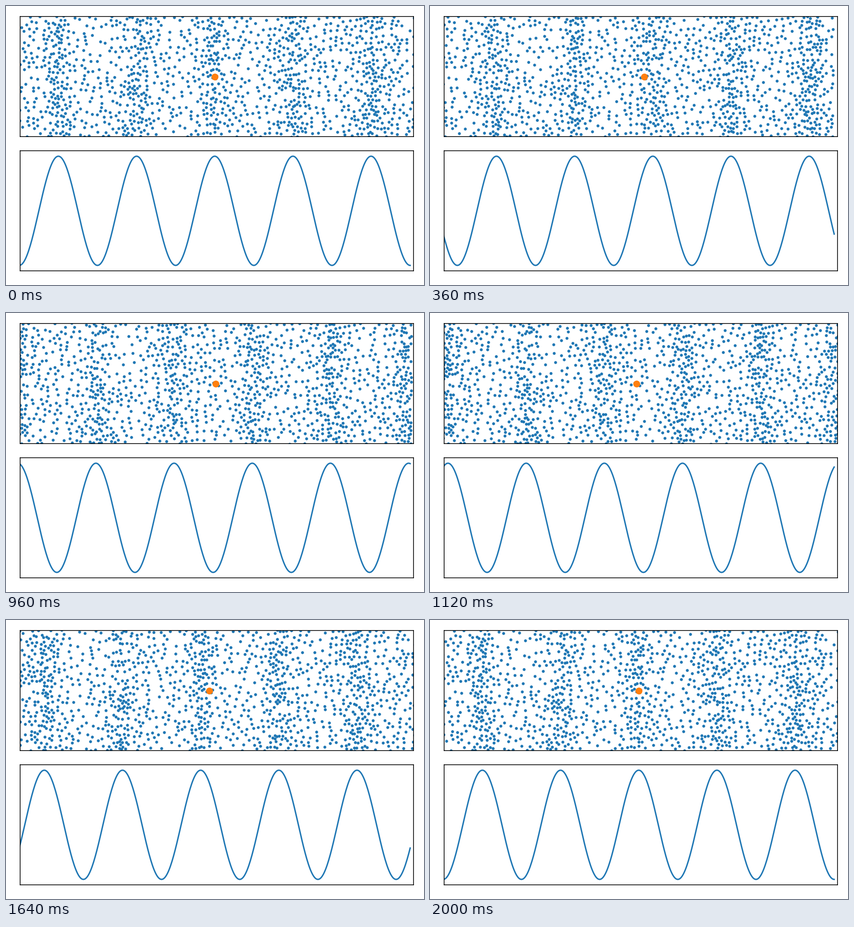
Recreate the animation shown at these times as a matplotlib script. Size 917x611 px, loop 2040 ms.

```python
import matplotlib.pyplot as plt
import numpy as np
from matplotlib.animation import FuncAnimation

W, H, DPI = 917, 611, 128
LEFT, RIGHT = 31, 894
PX = 72 / DPI                  # one pixel in points
STEPS = 50                     # frames per wave period
WAVE = 171.5                   # wavelength
MID = 457.9                    # rest position of the marked particle
SWING = 13.0                   # displacement amplitude
BLUE, ORANGE = "#1f77b4", "#ff7f0e"


def panel(top, bottom, ylim):
    ax = fig.add_axes([LEFT / W, 1 - bottom / H,
                       (RIGHT - LEFT) / W, (bottom - top) / H])
    ax.set(xlim=(LEFT, RIGHT), ylim=ylim, xticks=[], yticks=[])
    for spine in ax.spines.values():
        spine.set_linewidth(1.6 * PX)
    return ax


def scatter_particles(count, gap, seed=4):
    """Random rest positions that keep a small distance from each other."""
    rng = np.random.default_rng(seed)
    pts = np.empty((count, 2))
    n = 0
    while n < count:
        p = rng.uniform((19, 22), (895, 287))
        if np.all(np.hypot(*(pts[:n] - p).T) > gap):
            pts[n] = p
            n += 1
    return pts.T


def phase(x, frame):
    return 2 * np.pi * ((x - MID) / WAVE - frame / STEPS)


def displaced(x, frame):
    return x - SWING * np.sin(phase(x, frame))


fig = plt.figure(figsize=(W / DPI, H / DPI), dpi=DPI, facecolor="white")
gas = panel(23, 286, (286, 23))
graph = panel(317, 580, (-1.1, 1.1))

px, py = scatter_particles(1320, 7)
xs = np.linspace(MID - 2.5 * WAVE, MID + 2.5 * WAVE, 500)

dots, = gas.plot(px, py, "o", color=BLUE, ms=6.4 * PX, mew=0)
marked, = gas.plot([MID], [154.5], "o", color=ORANGE, ms=15 * PX, mew=0)
curve, = graph.plot(xs, np.cos(phase(xs, 0)), color=BLUE, lw=3.1 * PX)


def update(frame):
    dots.set_xdata(displaced(px, frame))
    marked.set_xdata([displaced(MID, frame)])
    curve.set_ydata(np.cos(phase(xs, frame)))
    return dots, marked, curve


anim = FuncAnimation(fig, update, frames=STEPS + 1, interval=40,
                     repeat=True, repeat_delay=0)
plt.show()
```
